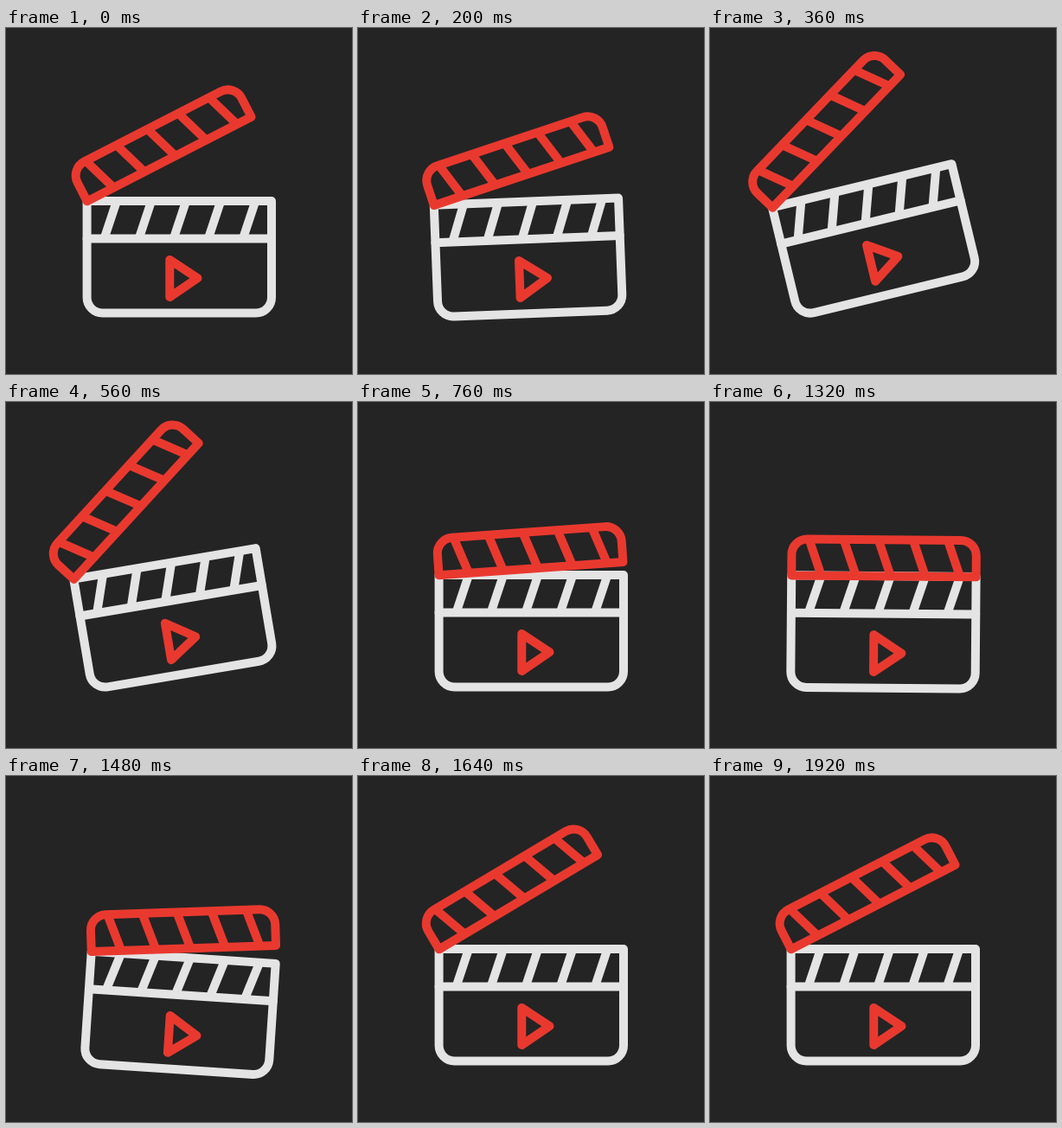
Recreate the animation shown at these times as an HTML page. Size 400 by 400 pixels, loop 2000 ms.

```html
<!DOCTYPE html>
<html>
<head>
<meta charset="utf-8">
<style>
html, body { margin: 0; width: 100%; height: 100%; overflow: hidden; background: #242424; }
svg { display: block; width: 100vw; height: 100vh; }
path { fill: none; stroke-width: 10; stroke-linejoin: round; }
.white { stroke: #e4e4e4; }
.red { stroke: #e9392f; }
</style>
</head>
<body>
<svg viewBox="0 0 400 400">
  <g id="board">
    <path class="white" id="slats"/>
    <path class="white" d="M93.6 200H307V311.5a18 18 0 0 1-18 18H111.6a18 18 0 0 1-18-18z"/>
    <path class="white" stroke-linecap="round" d="M93.6 243.5H307"/>
    <path class="red" d="M189.3 268V311L221.5 289.2z"/>
    <g id="clap">
      <path class="red" id="bars"/>
      <path class="red" d="M93.6 200.3V176a18 18 0 0 1 18-18H289a18 18 0 0 1 18 18V200.3z"/>
    </g>
  </g>
</svg>
<script>
const el = id => document.getElementById(id);
const LOOP = 2000, STEP = 40;

const stripes = dy =>
  [0, 1, 2, 3, 4].map(i => `M${128 + i * 40.1} 200l-14.5 ${dy}`).join('');
el('slats').setAttribute('d', stripes(43.5));
el('bars').setAttribute('d', stripes(-42));

// Smooth step from 0 at time a to 1 at time b
function ease(t, a, b) {
  const u = Math.min(1, Math.max(0, (t - a) / (b - a)));
  return u * u * (3 - 2 * u);
}
// Rise to 1 at the peak, then fall back to 0
const pulse = (t, start, peak, end) => ease(t, start, peak) - ease(t, peak, end);

function draw() {
  const t = Math.floor(performance.now() % LOOP / STEP) * STEP;

  const swing = pulse(t, 120, 420, 760);
  const dip = pulse(t, 1290, 1440, 1600);
  const tilt = 4.5 * (pulse(t, 40, 120, 220) + dip) - 15.2 * swing;
  const y = 4.4 * (pulse(t, 40, 160, 360) + dip);
  const x = 4.5 * swing - 0.6 * y;

  const angle = 27.2
    - 11.7 * ease(t, 40, 180) + 24.5 * ease(t, 170, 470)   // wind up
    - 38 * ease(t, 520, 800) - 2 * ease(t, 760, 1040)      // clap shut
    + 36.5 * ease(t, 1400, 1720) - 9.3 * ease(t, 1720, 1840); // reopen and settle

  el('board').setAttribute('transform', `translate(${x} ${y}) rotate(${tilt} 112 311)`);
  el('clap').setAttribute('transform', `rotate(${-angle} 93.8 200)`);
  requestAnimationFrame(draw);
}
draw();
</script>
</body>
</html>
```
